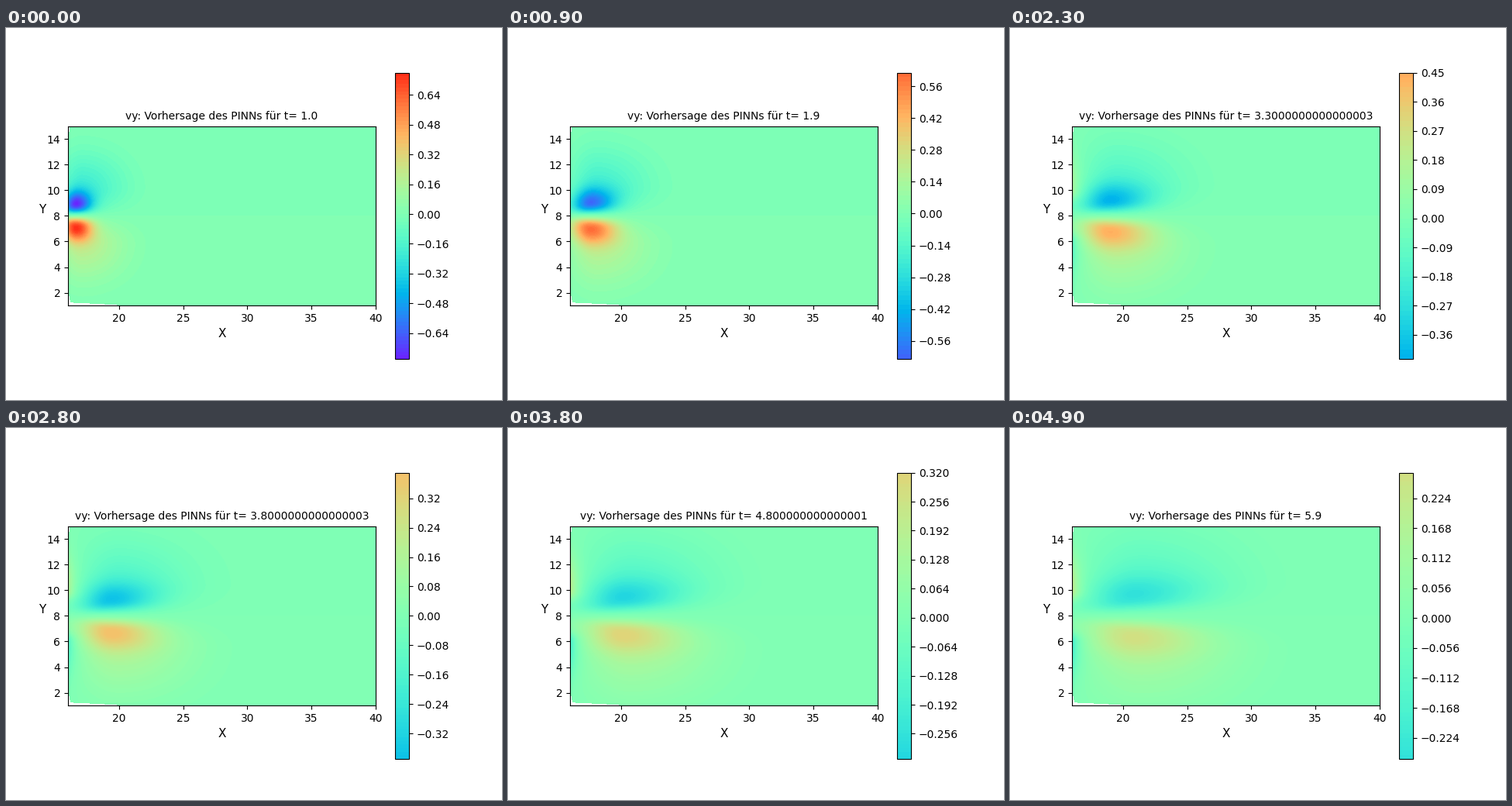
A matplotlib script that plays this animation: 640x480 px, repeating every 5 s.

```python
import numpy as np
import matplotlib.pyplot as plt
from matplotlib.animation import FuncAnimation
from matplotlib.patches import Polygon

FRAMES, INTERVAL = 50, 100
LAST_FIELD = 48          # the field holds still for the final step
LIMIT = 0.85             # fixed colour range

X, Y = np.meshgrid(np.linspace(16, 40, 169), np.linspace(1, 15, 113))
D = np.abs(Y - 8)
UPPER = Y > 8

# corners of the domain that hold no samples
GAPS = [
    [(16, 1), (16, 2), (16.17, 1.2), (18.3, 1.1), (19.9, 1)],
    [(16, 15), (16.1, 15), (16, 14)],
]

fig = plt.figure(figsize=(6.4, 4.8), dpi=100)


def bell(u, centre, low, high):
    """Gaussian with a separate width on each side of its centre."""
    off = u - centre
    return np.exp(-0.5 * (off / np.where(off < 0, low, high)) ** 2)


def extremes(k):
    """Highest and lowest velocity: decay that slows towards the end."""
    peak = 0.75 * np.exp(-k * (0.0235 - 2.7e-6 * (k - 20) ** 2))
    return peak, -peak * (1.006 - 0.027 * np.tanh((k - 16) / 6))


def field(k):
    s = k / LAST_FIELD
    xc = 16.6 + 5.3 * s - 1.5 * s ** 2
    off = X - xc
    ridge = 0.85 + 0.4 * s + np.where(off < 0, 0.1, 0.04) * off
    core = (bell(X, xc, 0.7 + 1.6 * s, 0.9 + 2.75 * s)
            * bell(D, ridge, 0.6, 0.75 + 0.5 * s))
    halo = (bell(X, xc + 0.5 + 0.5 * s, 1.2 + 1.8 * s, 2.3 + 2.6 * s)
            * bell(D, 2.2 + 0.5 * s, 1.2, 1.9 + 0.9 * s))
    shape = (core + (0.3 + 0.25 * s) * halo) * np.tanh(D / 0.35)
    shape /= shape.max()

    # opposite-signed inflow along the left edge
    inflow = 0.27 * max(0, 1 - np.exp(-(k - 8) / 12))
    strip = inflow * np.exp(-(X - 16) / 0.6) * bell(D, 2, 0.5, 1.9)

    peak, dip = extremes(k)
    return np.where(UPPER, dip * shape + strip, peak * shape - strip)


def draw(k):
    fig.clear()
    ax = fig.add_subplot()
    bands = ax.contourf(X, Y, field(min(k, LAST_FIELD)), 80,
                        cmap="rainbow", vmin=-LIMIT, vmax=LIMIT)
    for gap in GAPS:
        ax.add_patch(Polygon(gap, color="white", lw=0, zorder=1.5,
                             antialiased=False))
    ax.set_aspect("equal")
    ax.set_xlim(16, 40)
    ax.set_ylim(1, 15)
    ax.set_xlabel("X", fontsize=11)
    ax.set_ylabel("Y", fontsize=11, rotation=0)
    ax.set_title(f"vy: Vorhersage des PINNs für t= {1 + 0.1 * k}", fontsize=10)
    fig.colorbar(bands, ax=ax)
    return []


anim = FuncAnimation(fig, draw, frames=FRAMES, interval=INTERVAL,
                     init_func=lambda: [], repeat=True, repeat_delay=0)
plt.show()
```
